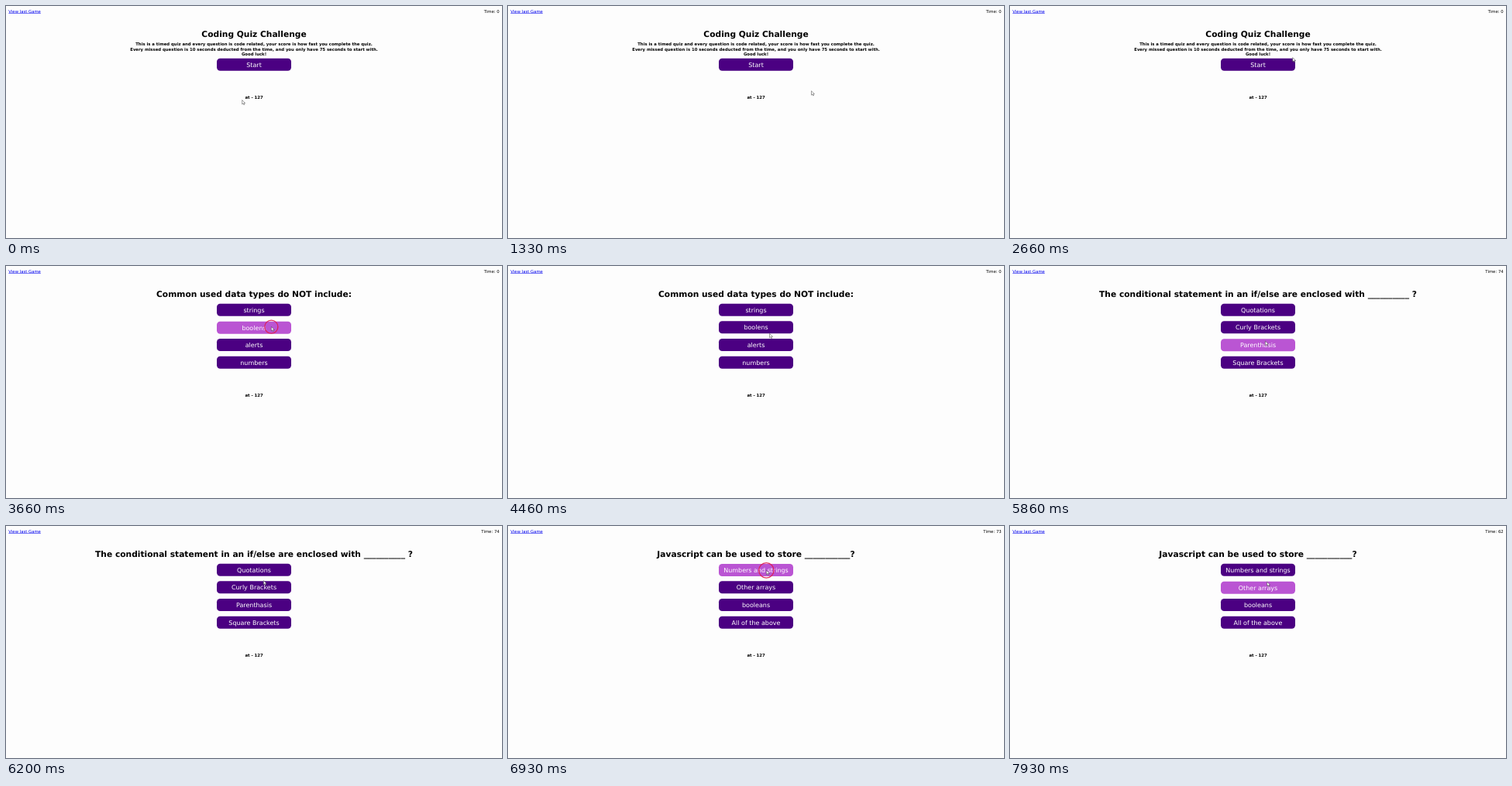
An HTML page that plays this animation: 640 px wide and 300 px high, repeating every 8000 ms.

```html
<!DOCTYPE html>
<html lang="en">
<head>
<meta charset="utf-8">
<title>Coding Quiz</title>
<style>
  html, body { margin: 0; width: 100%; height: 100%; overflow: hidden; background: #fdfdfd; }
  svg { display: block; width: 640px; height: 300px; }
  text { font: 16px "DejaVu Sans", sans-serif; text-rendering: geometricPrecision; }
  .mid { text-anchor: middle; font-weight: bold; }
  .title { font-size: 32px; }
  .label { font-size: 24px; text-anchor: middle; fill: #fff; }
  .link { fill: #00e; text-decoration: underline; }
  .button rect { fill: #4b0082; }
  .button.hover rect { fill: #ba55d3; }
</style>
</head>
<body>
<svg id="stage" viewBox="0 0 1920 900">
  <rect width="1920" height="900" fill="#fdfdfd"/>
  <text class="link" x="10" y="26">View last Game</text>
  <text id="timer" x="1910" y="26" text-anchor="end"></text>
</svg>
<script>
const LOOP = 8000, FPS = 15, LAST = LOOP * FPS / 1000 - 1;
const stage = document.getElementById('stage');
const timer = document.getElementById('timer');

function add(parent, tag, attrs, text) {
  const el = document.createElementNS('http://www.w3.org/2000/svg', tag);
  for (const name in attrs) el.setAttribute(name, attrs[name]);
  if (text) el.textContent = text;
  parent.appendChild(el);
  return el;
}

const BUTTON = { x: 816, w: 288, h: 48 };

function makeScene({ start, title, lines = [], top, labels, foot }) {
  const group = add(stage, 'g', {});
  const centred = (text, y, cls = 'mid') => add(group, 'text', { x: 960, y, class: cls }, text);
  centred(title, 121, 'mid title');
  lines.forEach((line, i) => centred(line, 154 + 19 * i));
  const buttons = labels.map((label, i) => {
    const y = top + 68 * i;
    const el = add(group, 'g', { class: 'button' });
    add(el, 'rect', { x: BUTTON.x, y, width: BUTTON.w, height: BUTTON.h, rx: 13 });
    add(el, 'text', { x: 960, y: y + 33, class: 'label' }, label);
    return { el, y };
  });
  centred('at - 127', foot);
  return { start, group, buttons };
}

const question = (start, title, labels) => makeScene({ start, title, labels, top: 146, foot: 507 });

const scenes = [
  makeScene({
    start: 0,
    title: 'Coding Quiz Challenge',
    lines: [
      'This is a timed quiz and every question is code related, your score is how fast you complete the quiz.',
      'Every missed question is 10 seconds deducted from the time, and you only have 75 seconds to start with.',
      'Good luck!'
    ],
    top: 203,
    labels: ['Start'],
    foot: 360
  }),
  question(55, 'Common used data types do NOT include:',
    ['strings', 'boolens', 'alerts', 'numbers']),
  question(84, 'The conditional statement in an if/else are enclosed with ' + '_'.repeat(10) + ' ?',
    ['Quotations', 'Curly Brackets', 'Parenthasis', 'Square Brackets']),
  question(104, 'Javascript can be used to store ' + '_'.repeat(11) + '?',
    ['Numbers and strings', 'Other arrays', 'booleans', 'All of the above'])
];

const ring = add(stage, 'circle', { fill: 'none', stroke: '#e01e50', 'stroke-width': 4, 'stroke-opacity': .9 });
const cursor = add(stage, 'path', {
  d: 'M0 0V16L4 12.5L6.6 18.5L9.2 17.4L6.7 11.5H12Z',
  fill: '#fff', stroke: '#222', 'stroke-width': 1.3, 'stroke-linejoin': 'round'
});

// Pointer stops: tick, x, y
const path = [
  [0, 914, 365], [1, 990, 367], [2, 1110, 364], [3, 1221, 360], [4, 1206, 357], [5, 1186, 354],
  [18, 1186, 354], [26, 1112, 198], [39, 1112, 198], [40, 1094, 200], [45, 1027, 236],
  [63, 1027, 236], [73, 986, 311], [86, 986, 311], [93, 997, 212],
  [94, 997, 212], [100, 1000, 172], [116, 1000, 172], [119, 995, 217]
];

// Mouse presses: first tick, last held tick, tick when the ring is gone
const clicks = [[53, 53, 58], [82, 82, 87], [102, 103, 107]];

// Countdown: tick, seconds shown
const times = [[0, 0], [70, 75], [85, 74], [100, 73], [115, 62]];

function pointerAt(tick) {
  const i = Math.max(1, path.findIndex(p => p[0] >= tick));
  const [t0, x0, y0] = path[i - 1], [t1, x1, y1] = path[i];
  const p = (tick - t0) / (t1 - t0), e = p * p * (3 - 2 * p);
  return [x0 + (x1 - x0) * e, y0 + (y1 - y0) * e];
}

function drawRing(tick, x, y) {
  const click = clicks.find(c => tick >= c[0] && tick < c[2]);
  ring.style.display = click ? '' : 'none';
  if (!click) return;
  ring.setAttribute('cx', x);
  ring.setAttribute('cy', y);
  ring.setAttribute('r', 33 - 3.7 * Math.max(0, tick - click[1]));
}

function draw(ms) {
  // Ticks begin on times rounded down to 10 ms
  const tick = Math.min(LAST, Math.floor((ms % LOOP + 7) * FPS / 1000));
  const [x, y] = pointerAt(tick);
  const scene = scenes.findLast(s => tick >= s.start);

  scenes.forEach(s => { s.group.style.display = s === scene ? '' : 'none'; });
  scene.buttons.forEach(b => {
    const over = x >= BUTTON.x && x <= BUTTON.x + BUTTON.w && y >= b.y && y <= b.y + BUTTON.h;
    b.el.classList.toggle('hover', over);
    b.el.setAttribute('transform', `translate(0 ${over ? 1 : 0})`);
  });

  timer.textContent = 'Time: ' + times.findLast(t => tick >= t[0])[1];
  cursor.setAttribute('transform', `translate(${x} ${y})`);
  drawRing(tick, x, y);
}

const begin = performance.now();
function loop() {
  draw(performance.now() - begin);
  requestAnimationFrame(loop);
}
loop();
</script>
</body>
</html>
```
